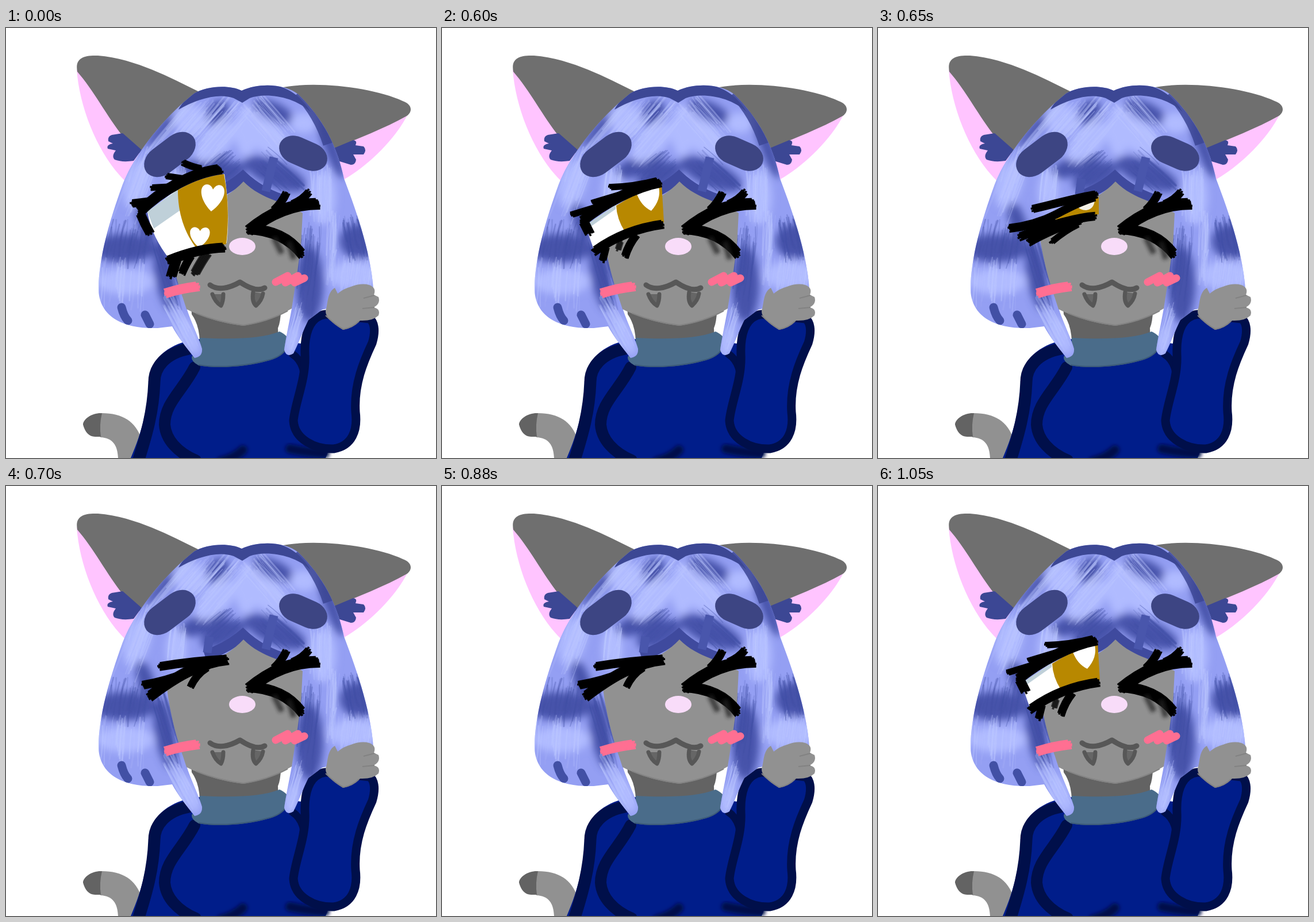
Write an HTML page that moves like this. It is 748 px wide and 748 px high and loops after 1100 ms.

```html
<!DOCTYPE html>
<html lang="en">
<head>
<meta charset="utf-8">
<title>Winking cat</title>
<style>
html, body { margin: 0; width: 100%; height: 100%; overflow: hidden; background: #fff; }
svg { display: block; width: 100%; height: 100%; }
.line { fill: none; stroke: #000f4a; stroke-linecap: round; stroke-linejoin: round; }
.brush { fill: none; stroke: #000; }
.pose { visibility: hidden; animation: 1100ms step-end infinite; }
#open { animation-name: open; }
#half { animation-name: half; }
#slit { animation-name: slit; }
#shut { animation-name: shut; }
@keyframes open { 0% { visibility: visible } 54.545%, 100% { visibility: hidden } }
@keyframes half { 0% { visibility: hidden } 54.545% { visibility: visible } 59.09% { visibility: hidden } 95.454%, 100% { visibility: visible } }
@keyframes slit { 0% { visibility: hidden } 59.09% { visibility: visible } 63.636% { visibility: hidden } 90.909% { visibility: visible } 95.454%, 100% { visibility: hidden } }
@keyframes shut { 0% { visibility: hidden } 63.636% { visibility: visible } 90.909%, 100% { visibility: hidden } }
</style>
</head>
<body>
<svg viewBox="0 0 748 748">
  <defs>
    <path id="hairShape" d="M410 109C388 98 348 101 327 114C272 158 222 222 203 272C180 335 161 400 161 456C163 500 200 524 264 522L289 519C298 536 314 556 328 574Q342 572 341 558C336 540 322 512 315 490L400 400L497 488C492 515 486 545 484 560Q488 574 500 566C510 546 518 524 526 508L550 490L640 470C638 400 612 325 588 262C576 205 552 158 508 115C485 97 440 95 410 109Z"/>
    <clipPath id="hairClip"><use href="#hairShape"/></clipPath>
    <filter id="soft" x="-50%" y="-50%" width="200%" height="200%"><feGaussianBlur stdDeviation="7"/></filter>
    <filter id="fray" x="-50%" y="-50%" width="200%" height="200%"><feGaussianBlur stdDeviation="3"/></filter>
    <path id="heart" d="M0 25C-10 17-21 2-20-11C-18-24-5-24 0-13C5-25 19-25 20-11C21 2 10 17 0 25Z" fill="#fff"/>
  </defs>

  <g id="tail">
    <path fill="#919191" d="M164 670C200 669 226 683 236 716L222 748H195C194 726 186 713 164 712Z"/>
    <path fill="#636363" d="M167 670C150 669 134 680 134 690C137 702 144 711 155 711H165Q162 690 167 670Z"/>
  </g>

  <g id="ears">
    <path fill="#ffc4ff" d="M123 72C128 142 162 222 207 266L245 215L200 180Z"/>
    <path fill="#6f6f6f" d="M124 76C120 54 132 47 160 48C222 53 282 84 336 111L232 218L203 188C176 154 152 108 124 76Z"/>
    <path fill="#ffc4ff" d="M699 150C680 188 636 236 587 264L564 208Z"/>
    <path fill="#6f6f6f" d="M476 104C540 91 640 104 690 127C709 134 706 147 697 153C660 174 610 193 568 211L510 130Z"/>
    <path fill="#3c4794" d="M203 183L184 186Q176 189 178 197L186 201Q174 203 177 210L191 213Q183 223 189 229Q202 234 222 231L236 212Z"/>
    <path fill="#3c4794" d="M568 210L604 195Q612 196 608 204L622 206Q628 212 622 220L604 220L609 229Q608 238 600 238L574 230Z"/>
  </g>

  <path fill="#636363" d="M322 480L323 498Q336 516 337 545H474L473 522Q479 508 478 482Z"/>

  <g id="sweater">
    <path fill="#001d8a" d="M340 541C295 543 252 570 250 608C246 660 238 700 217 748H556L575 700L520 550L485 545Z"/>
    <path class="line" stroke-width="21" d="M318 558C277 566 258 590 258 616C256 668 245 706 228 760"/>
    <path class="line" stroke-width="20" d="M328 590C308 630 276 652 276 690C278 716 298 738 330 752"/>
    <g class="line" stroke-width="16" filter="url(#fray)">
      <path d="M374 754Q398 748 412 734M494 732Q520 738 555 740"/>
    </g>
    <path class="line" stroke-width="13" d="M498 567Q515 578 518 600"/>
    <path class="line" stroke-width="15" style="fill:#001d8a" d="M556 498C524 502 519 540 520 568C522 612 503 650 500 683C502 716 538 733 570 732C602 727 612 700 608 668C605 620 622 580 637 548C644 525 640 510 632 506Z"/>
    <path fill="#4a6c8a" d="M337 539C400 542 445 540 476 528Q493 536 492 548C486 566 473 575 455 579C420 589 370 593 335 587Q322 580 323 572Q338 558 337 539Z"/>
    <path fill="none" stroke="#3c5a78" stroke-width="2" d="M335 586C370 592 420 588 455 578Q480 572 488 557"/>
  </g>

  <use href="#hairShape" fill="#949ff3"/>
  <g clip-path="url(#hairClip)">
    <g filter="url(#soft)">
      <g fill="#4653aa">
        <ellipse cx="205" cy="383" rx="56" ry="25"/>
        <ellipse cx="614" cy="371" rx="34" ry="30"/>
        <ellipse cx="342" cy="240" rx="44" ry="17" transform="rotate(-20 342 240)"/>
        <ellipse cx="378" cy="258" rx="42" ry="20" transform="rotate(-25 378 258)"/>
        <ellipse cx="468" cy="254" rx="58" ry="22" transform="rotate(24 468 254)"/>
        <ellipse cx="368" cy="148" rx="18" ry="24" transform="rotate(25 368 148)"/>
        <ellipse cx="465" cy="145" rx="38" ry="16" transform="rotate(25 465 145)"/>
        <ellipse cx="284" cy="162" rx="9" ry="62" transform="rotate(42 284 162)"/>
        <ellipse cx="276" cy="430" rx="17" ry="62" transform="rotate(-10 276 430)"/>
        <ellipse cx="528" cy="446" rx="24" ry="66"/>
        <ellipse cx="243" cy="338" rx="14" ry="36" transform="rotate(-18 243 338)"/>
        <ellipse cx="565" cy="205" rx="12" ry="60" transform="rotate(-20 565 205)"/>
      </g>
      <g fill="#b0bbff">
        <ellipse cx="208" cy="441" rx="50" ry="23"/>
        <ellipse cx="604" cy="430" rx="44" ry="25"/>
        <ellipse cx="318" cy="158" rx="28" ry="28"/>
        <ellipse cx="365" cy="198" rx="45" ry="24" transform="rotate(-45 365 198)"/>
        <ellipse cx="455" cy="192" rx="45" ry="25" transform="rotate(30 455 192)"/>
        <ellipse cx="418" cy="178" rx="20" ry="46"/>
        <ellipse cx="518" cy="165" rx="24" ry="18"/>
        <ellipse cx="228" cy="270" rx="22" ry="44" transform="rotate(18 228 270)"/>
        <ellipse cx="296" cy="285" rx="18" ry="38"/>
        <ellipse cx="552" cy="295" rx="22" ry="48"/>
        <ellipse cx="318" cy="535" rx="14" ry="36" transform="rotate(-25 318 535)"/>
        <ellipse cx="496" cy="548" rx="11" ry="28" transform="rotate(15 496 548)"/>
      </g>
    </g>
    <g id="streaks" fill="none" stroke-linecap="round"></g>
    <path fill="#3c4794" d="M300 142C322 100 380 88 410 104C440 88 500 94 530 146C500 118 450 112 424 122L411 130L396 122C370 112 330 124 300 142Z"/>
    <path fill="none" stroke="#3c4794" stroke-width="17" d="M508 113Q543 150 560 202" opacity=".85"/>
    <path fill="none" stroke="#3f4a9e" stroke-width="19" d="M346 295Q385 282 412 259Q440 285 478 298"/>
    <path fill="none" stroke="#4956ac" stroke-width="15" d="M452 284L466 225M350 290L354 262"/>
    <path fill="none" stroke="#4250a5" stroke-width="15" stroke-linecap="round" d="M201 486Q205 502 212 509M242 499L250 515"/>
  </g>

  <path fill="#919191" d="M413 267Q400 281 381 293L280 352C284 385 292 420 300 446L314 489C345 505 385 515 413 518C445 513 475 501 497 488L505 436L513 380L516 322C490 303 445 300 413 267Z"/>
  <path fill="none" stroke="#848484" stroke-width="2" d="M330 496Q370 512 413 517Q455 511 490 492"/>

  <g fill="#3d4583">
    <rect x="-51" y="-25" width="102" height="50" rx="32" ry="25" transform="translate(285 220) rotate(-37)"/>
    <rect x="-44" y="-24" width="88" height="48" rx="30" ry="24" transform="translate(517 218) rotate(24)"/>
  </g>

  <g id="wink">
    <path class="brush" stroke-width="20" d="M547 306C500 304 458 322 418 356"/>
    <path class="brush" stroke-width="18" d="M418 350C462 350 496 366 518 398"/>
    <path class="brush" stroke-width="13" d="M462 320Q480 306 490 282"/>
    <path class="brush" stroke-width="13" d="M494 308Q518 300 530 281"/>
    <g filter="url(#fray)" fill="none" stroke="#222" stroke-width="10" opacity=".75">
      <path d="M466 364L480 392M492 372L501 402"/>
    </g>
  </g>

  <g class="pose" id="open">
    <path fill="#fff" d="M246 320L302 278L380 254Q390 320 384 374L286 404Q254 365 246 320Z"/>
    <path fill="#bfd0d9" d="M246 319L301 280L303 317L257 349Z"/>
    <path fill="#b88800" d="M299 282Q335 260 379 254C388 300 387 345 383 376L332 384C310 356 299 322 299 282Z"/>
    <use href="#heart" transform="translate(359 294) rotate(5)"/>
    <use href="#heart" transform="translate(337 363) rotate(3) scale(.86 .76)"/>
    <path class="brush" stroke-width="18" d="M378 245C330 249 270 280 228 324"/>
    <path class="brush" stroke-width="15" d="M232 318Q240 340 253 361"/>
    <path class="brush" stroke-width="13" d="M214 306L262 300"/>
    <path class="brush" stroke-width="10" d="M249 278L302 275"/>
    <path class="brush" stroke-width="10" d="M275 257L310 262"/>
    <path class="brush" stroke-width="11" d="M304 232Q322 242 346 246"/>
    <path class="brush" stroke-width="16" d="M384 382C350 382 315 391 276 407"/>
    <path class="brush" stroke-width="17" d="M297 400L286 437"/>
    <path class="brush" stroke-width="13" d="M325 392Q315 405 304 431"/>
    <path class="brush" stroke-width="16" stroke-opacity=".75" d="M352 389Q340 405 326 432"/>
  </g>

  <g class="pose" id="half">
    <path fill="#fff" d="M250 345L304 308L381 274L385 338L266 391Z"/>
    <path fill="#bfd0d9" d="M254 340L302 308V315L258 346Z"/>
    <path fill="#b88800" d="M303 309Q338 286 382 272L386 338L318 354Q304 332 303 309Z"/>
    <path fill="#fff" d="M339 289L377 276Q382 298 364 318Q347 310 339 289Z"/>
    <path class="brush" stroke-width="17" d="M383 268C334 276 280 306 240 339"/>
    <path class="brush" stroke-width="16" d="M244 332L259 362"/>
    <path class="brush" stroke-width="10" d="M221 326L280 308"/>
    <path class="brush" stroke-width="10" d="M288 277Q335 276 378 264"/>
    <path class="brush" stroke-width="11" d="M258 306L314 289"/>
    <path class="brush" stroke-width="15" d="M388 341C345 346 300 362 260 392"/>
    <path class="brush" stroke-width="13" d="M340 358Q324 376 317 402"/>
    <path class="brush" stroke-width="12" d="M286 378L278 410"/>
    <path class="brush" stroke-width="10" stroke-opacity=".7" d="M312 366L305 390"/>
  </g>

  <g class="pose" id="slit">
    <path fill="#fff" d="M270 350L310 328L312 338L280 350Z"/>
    <path fill="#b88800" d="M304 336Q342 310 384 294V324L340 330Z"/>
    <path fill="#f4f1e6" d="M347 309L377 297Q377 315 362 317Q350 317 347 309Z"/>
    <path class="brush" stroke-width="13" d="M384 289C350 293 310 306 264 316"/>
    <path class="brush" stroke-width="13" d="M382 293C345 303 315 323 275 341"/>
    <path class="brush" stroke-width="14" d="M224 349Q270 345 312 324"/>
    <path class="brush" stroke-width="14" d="M382 327C345 329 290 346 242 365"/>
    <path class="brush" stroke-width="15" d="M356 333Q310 345 257 375"/>
    <path class="brush" stroke-width="10" d="M352 340Q325 352 298 376"/>
  </g>

  <g class="pose" id="shut">
    <path class="brush" stroke-width="18" d="M389 302C335 306 290 335 245 370"/>
    <path class="brush" stroke-width="14" d="M235 347Q280 340 322 322"/>
    <path class="brush" stroke-width="14" d="M262 315Q325 304 388 301"/>
    <path class="brush" stroke-width="12" d="M354 314Q330 326 319 354"/>
  </g>

  <g id="muzzle">
    <ellipse cx="411" cy="380" rx="23" ry="15" fill="#f8dcf9"/>
    <g fill="none" stroke="#575757" stroke-width="9" stroke-linecap="round" stroke-linejoin="round">
      <path d="M355 447C368 457 388 453 407 442C422 452 438 459 450 452"/>
      <path fill="#666" stroke-width="7" d="M359 463Q364 477 374 483Q378 476 378 463M430 459Q427 476 435 483Q445 474 447 462"/>
    </g>
    <path class="brush" stroke-width="16" style="stroke:#ff6f92" d="M273 463Q306 452 339 449"/>
    <path fill="none" stroke="#ff6f92" stroke-width="13" stroke-linecap="round" stroke-linejoin="round" d="M469 442L490 431L486 443L508 431L502 443L519 435"/>
  </g>

  <path fill="#919191" d="M572 452C558 460 560 482 556 492Q555 506 586 525Q604 522 616 509Q638 510 648 500Q652 488 639 486Q652 480 648 468L640 464Q645 452 632 447Q618 443 600 450Q588 453 577 462Z"/>
  <path fill="none" stroke="#828282" stroke-width="2" d="M620 488L641 486M622 470L641 465M556 500Q572 516 587 524Q603 521 614 510"/>
</svg>
<script>
const NS = 'http://www.w3.org/2000/svg';
let seed = 11;
const rand = () => (seed = seed * 16807 % 2147483647) / 2147483647;
const spread = n => (rand() - .5) * n;

function add(parent, attrs) {
  const path = document.createElementNS(NS, 'path');
  for (const key in attrs) path.setAttribute(key, attrs[key]);
  parent.append(path);
}

// Hair strands: x1, y1, x2, y2, width of the lock, count, tone
const tones = { l: '#bcc7ff', m: '#8c98ee', d: '#4250a5' };
const locks = [
  [345, 135, 250, 245, 50, 36, 'l'],
  [400, 140, 325, 225, 60, 36, 'l'],
  [430, 135, 490, 205, 60, 34, 'l'],
  [390, 225, 340, 270, 46, 24, 'd'],
  [450, 230, 510, 285, 44, 24, 'd'],
  [245, 220, 205, 330, 45, 32, 'l'],
  [300, 250, 292, 320, 34, 26, 'l'],
  [212, 345, 200, 412, 84, 34, 'd'],
  [205, 412, 200, 485, 85, 36, 'l'],
  [265, 370, 300, 490, 28, 26, 'd'],
  [285, 480, 330, 565, 24, 24, 'l'],
  [548, 250, 548, 345, 38, 28, 'l'],
  [532, 360, 520, 490, 36, 26, 'd'],
  [570, 335, 566, 440, 22, 22, 'l'],
  [604, 335, 616, 405, 40, 26, 'd'],
  [602, 402, 592, 468, 76, 28, 'l'],
  [512, 490, 493, 562, 20, 16, 'l']
];
const streaks = document.getElementById('streaks');
for (const [x1, y1, x2, y2, width, count, tone] of locks) {
  const dx = x2 - x1, dy = y2 - y1, len = Math.hypot(dx, dy);
  for (let i = 0; i < count; i++) {
    const side = spread(width), slide = spread(.35);
    const x = x1 - dy / len * side + dx * slide;
    const y = y1 + dx / len * side + dy * slide;
    const part = .5 + rand() * .5, bend = spread(12);
    add(streaks, {
      d: `M${x} ${y}q${dx * part / 2 + bend} ${dy * part / 2} ${dx * part} ${dy * part}`,
      stroke: tones[tone], 'stroke-width': 1 + rand() * 2.5, opacity: .12 + rand() * .3
    });
  }
}

// Split each brush path into bristles with ragged ends
for (const path of document.querySelectorAll('.brush')) {
  const width = +path.getAttribute('stroke-width');
  const len = path.getTotalLength();
  const a = path.getPointAtLength(0), b = path.getPointAtLength(len);
  const span = Math.hypot(b.x - a.x, b.y - a.y);
  const group = document.createElementNS(NS, 'g');
  const count = Math.ceil(width / 2.5), hair = width / count;
  for (let i = 0; i < count; i++) {
    const off = (i + .5) * hair - width / 2;
    const edge = Math.abs(off) / width * 6;
    const start = rand() * 4 + edge, end = rand() * 5 + edge;
    const bristle = path.cloneNode();
    bristle.setAttribute('stroke-width', hair + 1.4);
    bristle.setAttribute('stroke-dasharray', `0 ${start} ${Math.max(1, len - start - end)} ${len}`);
    bristle.setAttribute('transform', `translate(${(a.y - b.y) / span * off} ${(b.x - a.x) / span * off})`);
    group.append(bristle);
  }
  path.replaceWith(group);
}
</script>
</body>
</html>
```
